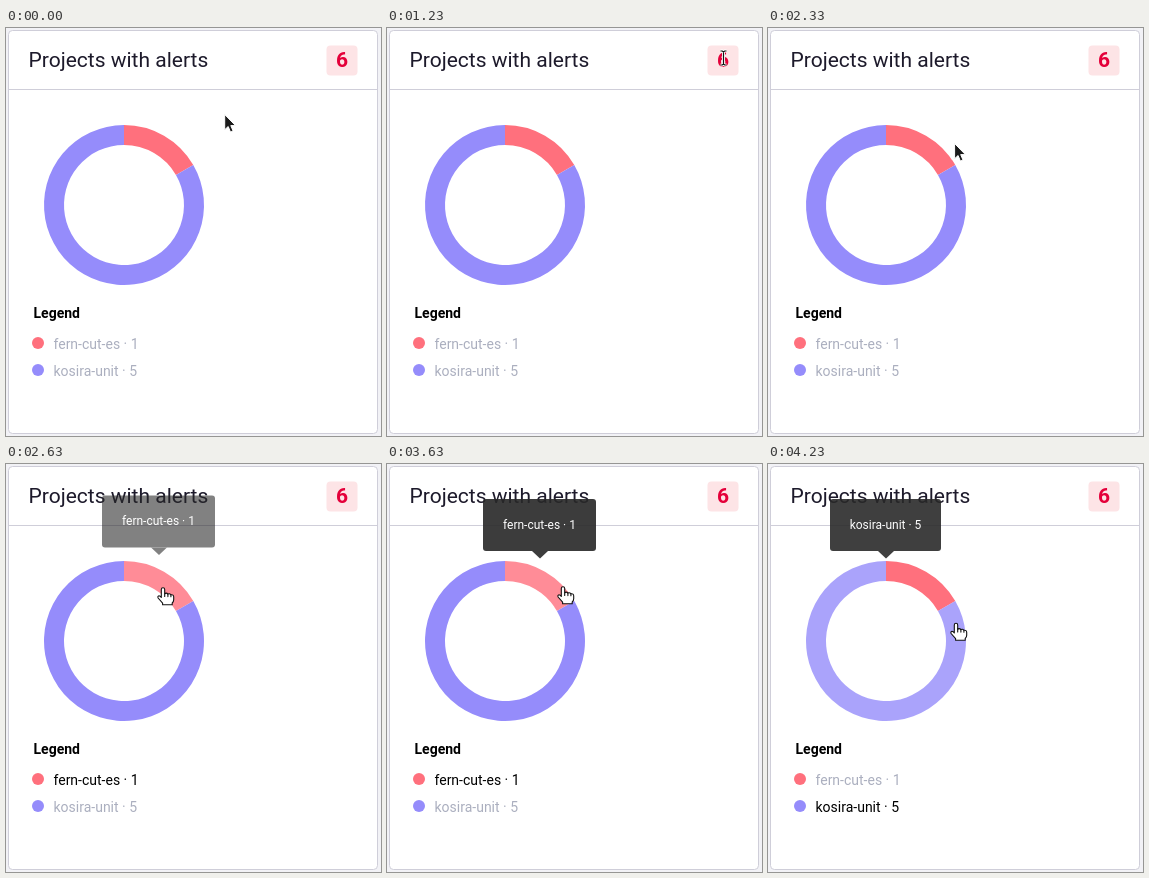
Animation, 375 px wide and 408 px high, one loop 5.43 s. Source, as an HTML page:

```html
<!DOCTYPE html>
<html lang="en">
<head>
<meta charset="utf-8">
<title>Projects with alerts</title>
<style>
  html, body { margin: 0; width: 100%; height: 100%; overflow: hidden; background: #f2f2f6; }
  svg { display: block; width: 375px; height: 408px; font-family: Roboto, sans-serif; }
  .legend { font-size: 14px; }
</style>
</head>
<body>
<svg viewBox="0 0 375 408">
  <rect x="2.5" y="2.5" width="369" height="403" rx="4" fill="#fff" stroke="#cfced9"/>
  <path d="M3 61.5H371" stroke="#cfced9"/>
  <text x="22.5" y="39" font-size="21" fill="#1d1a2b">Projects with alerts</text>
  <rect x="320.5" y="17.5" width="31" height="30" rx="4" fill="#fde4e6"/>
  <text x="336" y="39" font-size="21" font-weight="700" text-anchor="middle" fill="#e4003a">6</text>

  <path class="slice" fill="#ff707d"/>
  <path class="slice" fill="#958cfb"/>

  <text x="27.5" y="290" font-size="14" font-weight="700">Legend</text>
  <circle cx="32" cy="315" r="6" fill="#ff707d"/>
  <text class="legend" x="47.5" y="320.5"></text>
  <circle cx="32" cy="342" r="6" fill="#958cfb"/>
  <text class="legend" x="47.5" y="347.5"></text>

  <g id="tooltip">
    <rect y="35" height="52" rx="3" fill="#282828"/>
    <path d="M-7.5 87H8.5L.5 94.5Z" fill="#282828"/>
    <text y="65" font-size="12" text-anchor="middle" fill="#fff"></text>
  </g>

  <g id="arrow" class="cursor">
    <path d="M0 0V15.2L3.5 12L5.8 17.6L8.4 16.5L6.1 11.1H10.8Z" fill="#1a1a1a" stroke="#fff"/>
  </g>
  <g id="beam" class="cursor" fill="none">
    <path class="stem" stroke="#fff" stroke-width="3"/>
    <path class="stem" stroke="#111" stroke-width="1.2"/>
  </g>
  <g id="hand" class="cursor" stroke="#111" stroke-width="1.1" stroke-linejoin="round" stroke-linecap="round">
    <path fill="#fff" d="M-1.7 9.5V1.5A1.7 1.7 0 0 1 1.7 1.5V5.7Q3.6 4.4 4.9 6.1Q6.7 5.1 7.9 6.8Q10.7 6.3 10.7 8.9V11.8Q10.7 13.8 9.2 15V16.8H-.4V15.2L-4.9 10Q-5.6 8.1-4 7.7Q-2.8 7.7-1.7 9.5Z"/>
    <path fill="none" d="M1.7 5.7V8.4M4.9 6.1V8.6M7.9 6.8V8.8"/>
  </g>
</svg>
<script>
const LOOP = 5430;
const FADE = 300;
const ring = { x: 118, y: 177, outer: 80, inner: 60 };
const projects = [
  { label: 'fern-cut-es · 1', from: 0, to: 60, shownAt: 2490, tipX: 152.5, tipWidth: 113 },
  { label: 'kosira-unit · 5', from: 60, to: 360, shownAt: 3955, tipX: 117.5, tipWidth: 111 }
];

// Each move runs from the end of the one before it, in equal jumps.
const moves = [
  { at: 0, x: 218.7, y: 86.5 },
  { at: 400, x: 262.5, y: 74 },
  { at: 630, x: 326, y: 34, steps: 5, every: 75 },
  { at: 1130, x: 336.5, y: 30, steps: 2, every: 100 },
  { at: 1330, x: 320.5, y: 32, steps: 4, every: 100 },
  { at: 1730, x: 186.6, y: 115.5, steps: 7, every: 100 },
  { at: 2370, x: 157, y: 124, steps: 6, every: 33 },
  { at: 3630, x: 176, y: 123 },
  { at: 3700, x: 188, y: 156.5, steps: 8, every: 32 },
  { at: 4000, x: 188, y: 159.5, steps: 2, every: 30 }
];

const all = selector => [...document.querySelectorAll(selector)];
const slices = all('.slice');
const legends = all('.legend');
const cursors = all('.cursor');
const tooltip = document.getElementById('tooltip');
const tipBox = tooltip.querySelector('rect');
const tipText = tooltip.querySelector('text');

function polar(radius, degrees) {
  const a = degrees * Math.PI / 180;
  return `${ring.x + radius * Math.sin(a)} ${ring.y - radius * Math.cos(a)}`;
}

function ringSlice({ from, to }) {
  const { outer, inner } = ring;
  const large = to - from > 180 ? 1 : 0;
  return `M${polar(outer, from)}A${outer} ${outer} 0 ${large} 1 ${polar(outer, to)}` +
    `L${polar(inner, to)}A${inner} ${inner} 0 ${large} 0 ${polar(inner, from)}Z`;
}

// cubic-bezier(0, 0, .58, 1), solved by bisection
function easeOut(x) {
  if (x >= 1) return 1;
  let low = 0, high = 1;
  for (let i = 0; i < 20; i++) {
    const s = (low + high) / 2;
    if (1.74 * s * s * (1 - s) + s ** 3 < x) low = s; else high = s;
  }
  return 3 * low * low * (1 - low) + low ** 3;
}

function pointerAt(t) {
  const index = moves.findLastIndex(move => move.at <= t);
  const { at, x, y, steps = 1, every = 1 } = moves[index];
  const start = moves[Math.max(0, index - 1)];
  const p = Math.min(Math.floor((t - at) / every) + 1, steps) / steps;
  return { x: start.x + (x - start.x) * p, y: start.y + (y - start.y) * p };
}

function projectUnder({ x, y }) {
  const dx = x - ring.x, dy = y - ring.y;
  const radius = Math.hypot(dx, dy);
  if (radius < ring.inner || radius > ring.outer) return undefined;
  const angle = (Math.atan2(dx, -dy) * 180 / Math.PI + 360) % 360;
  return projects.find(({ from, to }) => angle >= from && angle < to);
}

const overNumber = ({ x, y }) => Math.abs(x - 336) < 7 && Math.abs(y - 32) < 12;

function drawTooltip(t) {
  const project = projects.findLast(({ shownAt }) => shownAt <= t);
  tooltip.style.display = project ? '' : 'none';
  if (!project) return;
  const p = easeOut((t - project.shownAt) / FADE);
  tooltip.setAttribute('transform', `translate(${project.tipX} ${-10 * (1 - p)})`);
  tooltip.setAttribute('opacity', 0.9 * p);
  tipBox.setAttribute('x', -project.tipWidth / 2);
  tipBox.setAttribute('width', project.tipWidth);
  tipText.textContent = project.label;
}

function draw(t) {
  const pointer = pointerAt(t);
  const hovered = projectUnder(pointer);
  const shape = hovered ? 'hand' : overNumber(pointer) ? 'beam' : 'arrow';

  projects.forEach((project, i) => {
    slices[i].setAttribute('opacity', project === hovered ? 0.8 : 1);
    legends[i].setAttribute('fill', project === hovered ? '#000' : '#abafbf');
  });
  cursors.forEach(cursor => {
    cursor.style.display = cursor.id === shape ? '' : 'none';
    cursor.setAttribute('transform', `translate(${pointer.x} ${pointer.y})`);
  });

  // The fade advances in thirtieths of a second.
  drawTooltip(30 + Math.floor((t - 30) * 0.03) / 0.03);
}

function tick() {
  draw(performance.now() % LOOP);
  requestAnimationFrame(tick);
}

projects.forEach((project, i) => {
  slices[i].setAttribute('d', ringSlice(project));
  legends[i].textContent = project.label;
});
all('.stem').forEach(stem =>
  stem.setAttribute('d', 'M-3-7H-1.2L0-6L1.2-7H3M0-6V6M-3 7H-1.2L0 6L1.2 7H3'));
tick();
</script>
</body>
</html>
```
